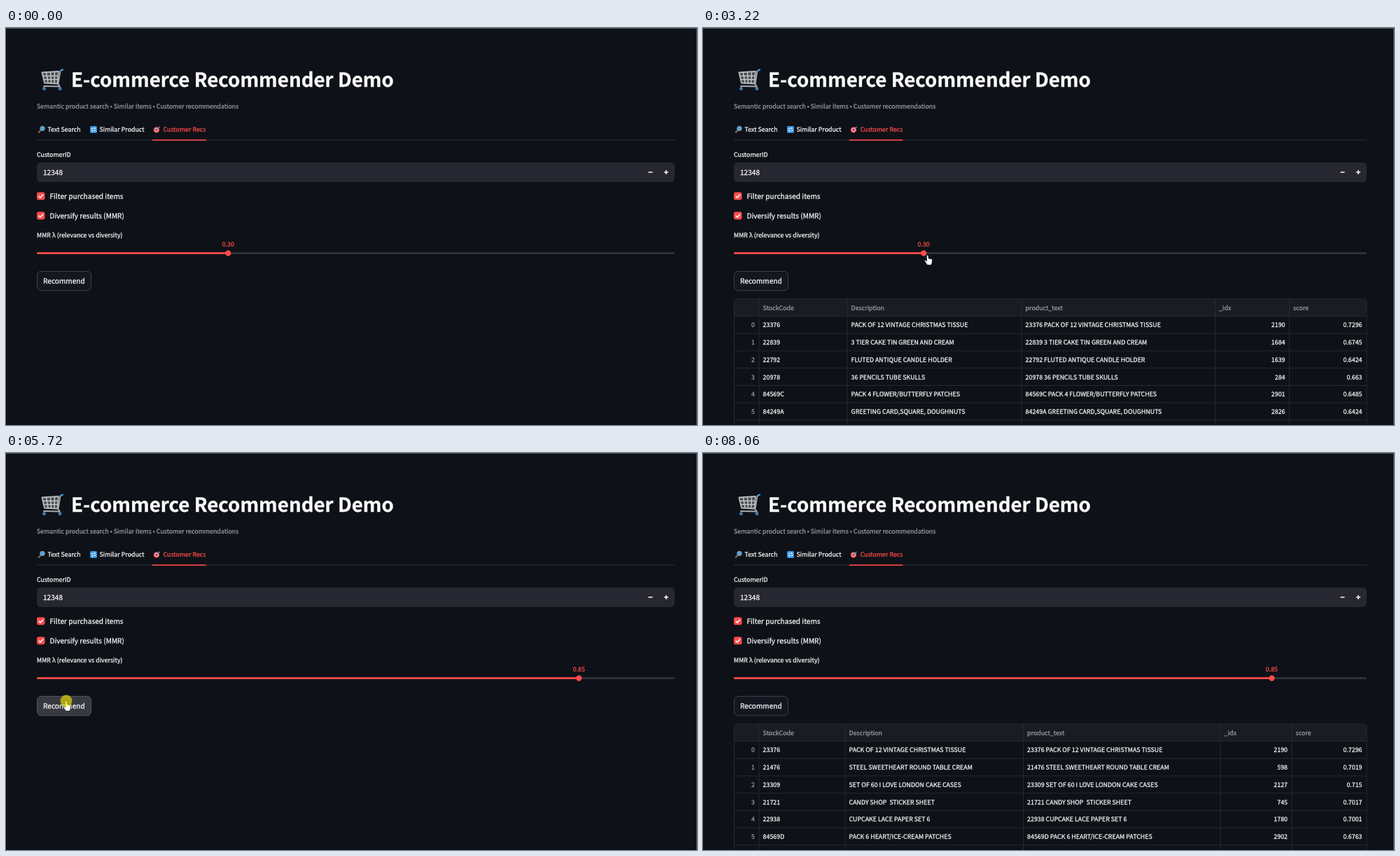
An HTML page for the animation above (8.85 s loop, 987x567 px).

```html
<!DOCTYPE html>
<html lang="en">
<head>
<meta charset="utf-8">
<title>E-commerce Recommender Demo</title>
<style>
html, body { margin: 0; width: 100%; height: 100%; overflow: hidden; background: #0e1117; }
svg { display: block; width: 987px; height: 567px; }
text {
  font: 10.15px "Noto Sans CJK JP", "Noto Sans CJK SC", "Noto Sans CJK", "Noto Sans", sans-serif;
  fill: #fafafa; stroke: #fafafa; stroke-width: .25; white-space: pre; text-rendering: geometricPrecision;
}
.title { font-size: 27.7px; font-weight: 700; stroke-width: .35; }
.small, .cell { font-size: 8.85px; }
.dim { fill: #9b9da2; stroke: #9b9da2; }
.red { fill: #ff4b4b; stroke: #ff4b4b; }
.end { text-anchor: end; }
.mid { text-anchor: middle; }
.grid { stroke: #262930; fill: none; }
.icon { stroke: #fafafa; stroke-width: 1.2; fill: none; }
.button { fill: #131720; stroke: #3d4047; }
.button.hover { fill: #262730; }
.button.down { fill: #363940; stroke: #50535a; }
</style>
</head>
<body>
<svg id="stage" viewBox="0 0 987 567">
  <rect width="987" height="567" fill="#0e1117"/>
  <path d="M0 .5H987M986.5 0V567" stroke="#54575c"/>

  <!-- cart -->
  <g fill="none" stroke-linecap="round" stroke-linejoin="round">
    <path d="M51.500 63.500L75 62 73.500 79.500 55 78.500Z" fill="#4a4d50" stroke="#b4b7b9" stroke-width="1.800"/>
    <path d="M52.500 68.500H74.500M54 73.500H74M57.500 63.500L60 78M63.500 63L64.500 78M69.500 62.500L69 78.500" stroke="#c3c6c8" stroke-width="1.500"/>
    <path d="M80.500 60L77.500 61.500 74.500 80.500 77 83.500 54 83" stroke="#a8abad" stroke-width="1.800"/>
    <path d="M78.500 60.500L81 59.500" stroke="#4398d4" stroke-width="2.200"/>
    <g fill="#3a4a55" stroke="#4398d4" stroke-width="1.300"><circle cx="54.500" cy="86.700" r="1.700"/><circle cx="77" cy="86.700" r="1.700"/></g>
  </g>
  <text class="title" x="93" y="84">E-commerce Recommender Demo</text>
  <text class="small dim" x="44" y="115">Semantic product search • Similar items • Customer recommendations</text>

  <!-- tab icons -->
  <path d="M50 145.500L46.800 149" stroke="#8a6a55" stroke-width="2" stroke-linecap="round"/>
  <circle cx="52" cy="143.500" r="3.300" fill="#4ea5e0" stroke="#8e9aa3" stroke-width=".9"/>
  <rect x="120" y="140" width="10" height="10" rx="1.500" fill="#2f8fe0"/>
  <path d="M122 145V143.200H127.500M126 141.800L127.700 143.200 126 144.600M128 145V146.800H122.500M124 145.400L122.300 146.800 124 148.200" fill="none" stroke="#fff" stroke-width=".9"/>
  <circle cx="215" cy="145.500" r="4.300" fill="#e0383e"/>
  <circle cx="215" cy="145.500" r="2.600" fill="none" stroke="#f5dcdc" stroke-width="1"/>
  <path d="M215 145.500L219.500 141" stroke="#4b9cd8" stroke-width="1.500"/>
  <text class="small" x="59.500" y="148.300">Text Search</text>
  <text class="small" x="133.500" y="148.300">Similar Product</text>
  <text class="small red" x="224.500" y="148.300">Customer Recs</text>
  <rect class="wide" x="44" y="159.400" height="1.400" fill="#262931"/>
  <rect x="209" y="159.300" width="76.500" height="1.600" fill="#ff4b4b"/>

  <text class="small" x="44" y="183.500">CustomerID</text>
  <rect class="wide" x="44" y="192" height="28" rx="5.500" fill="#262730"/>
  <text x="53" y="209.500">12348</text>
  <path id="steppers" d="M-37.500 206H-31.500M-15 206H-9M-12 203V209" stroke="#fafafa" stroke-width="1.500"/>

  <g id="checks"></g>
  <text x="62.500" y="243.700">Filter purchased items</text>
  <text x="62.500" y="271.900">Diversify results (MMR)</text>

  <text class="small" x="44" y="299.300">MMR λ (relevance vs diversity)</text>
  <rect class="wide" x="44" y="320.200" height="2.800" rx="1.400" fill="#31333b"/>
  <rect id="fill" x="44" y="320.200" height="2.800" rx="1.400" fill="#ff4b4b"/>
  <circle id="thumb" cy="321.600" r="4.200" fill="#ff4b4b"/>
  <text id="value" class="small red mid" y="312.400"></text>

  <rect id="button" class="button" x="44.500" y="347.500" width="77" height="27.500" rx="5.500"/>
  <text x="53" y="365">Recommend</text>

  <g id="tables"></g>
  <g id="tools" class="icon">
    <path d="M902.800 373.500V375.800H909.200V373.500M906 369.500V373.800M904 372L906 374 908 372"/>
    <circle cx="920.700" cy="372" r="2.300"/><path d="M922.400 373.700L925 376.300"/>
    <path d="M934.300 372V370H936.300M938 370H940V372M940 374V376H938M936.300 376H934.300V374"/>
  </g>
  <path id="busy" d="M879 .5Q879 2.200 882.500 2.200T886 .5M889.800 .8L889.200 2.600" fill="none" stroke="#a0a2a6" stroke-width="1.100"/>

  <g id="pointer" stroke="#0e1117" stroke-width=".7" fill="#fff" stroke-linejoin="round">
    <path id="arrow" d="M0 0V11L2.600 8.700 4.600 13 6.500 12.200 4.600 8H8Z"/>
    <path id="hand" d="M-1.500 1Q-.2-.7 1 1V5L5.500 6Q6.800 6.400 6.600 8L5.800 12.500Q5.500 14.500 3.800 14.500H.6Q-.8 14.500-1.600 13L-4.500 8.800Q-4.800 7.300-3.300 7.500L-1.500 9Z"/>
    <path id="fist" d="M-4-1Q-4-3.500-2-3.500-1-5 .3-4 2-4.500 2.500-3.300 4.500-3.300 4.500-1V1.500Q4.500 5 2 5H-1.500Q-3-1 5-4 2Z"/>
    <circle id="press" r="8.500" stroke="none" fill="#ffee00" fill-opacity=".6"/>
  </g>
</svg>
<script>
const LOOP = 8850, LEFT = 44, TOP = 387, ROW = 24.7;
const $ = id => document.getElementById(id);

// [time, x, y]
const path = [
  [250, 861, 481], [460, 650, 390], [670, 464, 333], [940, 464, 333], [1330, 88, 357],
  [1600, 88, 357], [1800, 250, 363], [1930, 338, 376], [2010, 338, 376], [2350, 372, 432],
  [2730, 345, 417], [2790, 345, 417], [3220, 321, 324], [3560, 321, 324], [3820, 451, 321],
  [3970, 451, 321], [4230, 638, 320], [4310, 638, 320], [4710, 818, 321], [4910, 818, 321],
  [5450, 86, 354], [6400, 86, 354], [6580, 95, 378], [6650, 110, 384], [6930, 300, 449],
  [7080, 300, 449], [7130, 308, 473], [7190, 308, 473], [7400, 330, 540], [7680, 350, 396], [8000, 420, 553]
];
const presses = [[1400, 1500], [3560, 4780], [5720, 5850]];
const busyTimes = [[1700, 2330], [4050, 5100], [5920, 6400]];
const shows = [[2330, 3970], [6400, LOOP]];
const within = (t, spans) => spans.findIndex(([a, b]) => t >= a && t < b);

const tables = [
  { cols: [80, 206, 455, 731.5, 837.5], idxEnd: 831.5, rows: [
    ["23376", "PACK OF 12 VINTAGE CHRISTMAS TISSUE", 2190, 0.7296],
    ["22839", "3 TIER CAKE TIN GREEN AND CREAM", 1684, 0.6745],
    ["22792", "FLUTED ANTIQUE CANDLE HOLDER", 1639, 0.6424],
    ["20978", "36 PENCILS TUBE SKULLS", 284, 0.663],
    ["84569C", "PACK 4 FLOWER/BUTTERFLY PATCHES", 2901, 0.6485],
    ["84249A", "GREETING CARD,SQUARE, DOUGHNUTS", 2826, 0.6424]] },
  { cols: [80, 203, 457.5, 739, 841], idxEnd: 835, rows: [
    ["23376", "PACK OF 12 VINTAGE CHRISTMAS TISSUE", 2190, 0.7296],
    ["21476", "STEEL SWEETHEART ROUND TABLE CREAM", 598, 0.7019],
    ["23309", "SET OF 60 I LOVE LONDON CAKE CASES", 2127, 0.715],
    ["21721", "CANDY SHOP  STICKER SHEET", 745, 0.7017],
    ["22938", "CUPCAKE LACE PAPER SET 6", 1780, 0.7001],
    ["84569D", "PACK 6 HEART/ICE-CREAM PATCHES", 2902, 0.6763]] }
];
const heads = ["StockCode", "Description", "product_text", "_idx", "score"];
const cell = (x, y, s, cls = "") => `<text class="cell ${cls}" x="${x}" y="${y}">${s}</text>`;

function tableMarkup({ cols, idxEnd, rows }) {
  const lines = cols.map(x => `M${x} ${TOP}V567`).join("") +
    rows.concat(0).map((_, i) => `M44 ${TOP + ROW * (i + 1)}H948`).join("");
  const body = rows.map(([code, name, idx, score], i) => {
    const y = 427.4 + ROW * i;
    return cell(74, y, i, "dim end") + cell(cols[0] + 5.6, y, code) + cell(cols[1] + 5.6, y, name) +
      cell(cols[2] + 5.6, y, `${code} ${name}`) + cell(idxEnd, y, idx, "end") + cell(941.5, y, score, "end");
  }).join("");
  return `<g><path d="M44.500 412V392.500Q44.500 387 50 387H942.500Q948 387 948 392.500V412Z" fill="#1a1c24"/>
    <rect class="glow" x="44" width="904" height="${ROW}" fill="#161920"/>
    <path class="grid" d="${lines}M44.500 570V392.500Q44.500 387 50 387H942.500Q948 387 948 392.500V570"/>
    ${heads.map((h, i) => cell(cols[i] + 5.6, 402.7, h, "dim")).join("")}${body}</g>`;
}
$("tables").innerHTML = tables.map(tableMarkup).join("");
$("checks").innerHTML = [240, 268].map(y =>
  `<rect x="44" y="${y - 5.6}" width="11.500" height="11.200" rx="2.800" fill="#ff4b4b"/>
   <path d="M46.800 ${y}L49 ${y + 2.3} 53 ${y - 2.3}" fill="none" stroke="#fff" stroke-width="1.600"/>`).join("");

const groups = [...$("tables").children];
const wide = document.querySelectorAll(".wide");
const show = (el, on) => { el.style.display = on ? "" : "none"; };

function pointerAt(t) {
  const i = path.findIndex(p => p[0] > t);
  if (i < 1) return path[path.length - 1].slice(1);
  const [t0, x0, y0] = path[i - 1], [t1, x1, y1] = path[i];
  const k = (t - t0) / (t1 - t0);
  return [x0 + (x1 - x0) * k, y0 + (y1 - y0) * k];
}

function sliderAt(t, x, width) {
  if (t < 3560) return 0.3;
  if (t >= 4710) return 0.85;
  return Math.max(0.3, Math.round((x - LEFT) / width * 20) / 20);
}

function draw(t) {
  const [x, y] = pointerAt(t);
  const live = t >= 250 && t < 8060;
  const table = within(t, shows), down = within(t, presses) >= 0;
  const width = table < 0 ? 911 : 904;
  const right = LEFT + width;

  wide.forEach(el => el.setAttribute("width", width));
  $("steppers").setAttribute("transform", `translate(${right})`);

  const value = sliderAt(t, x, width), thumbX = LEFT + value * width;
  $("fill").setAttribute("width", thumbX - LEFT);
  $("thumb").setAttribute("cx", thumbX);
  $("value").setAttribute("x", thumbX);
  $("value").textContent = value.toFixed(2);

  const onButton = live && x > 44 && x < 122 && y > 347 && y < 375;
  $("button").setAttribute("class", "button" + (onButton ? down ? " down" : " hover" : ""));

  // row highlight trails the pointer a little
  const row = Math.floor((pointerAt(Math.max(250, t - 65))[1] - TOP) / ROW) - 1;
  groups.forEach((g, i) => {
    show(g, i === table);
    const glow = g.querySelector(".glow");
    show(glow, live && row >= 0);
    glow.setAttribute("y", TOP + ROW * (row + 1));
  });
  show($("tools"), live && table >= 0 && y > TOP);
  show($("busy"), within(t, busyTimes) >= 0);

  const drag = t >= 3560 && t < 4780;
  const onThumb = Math.hypot(x - thumbX, y - 321) < 9;
  const hand = !drag && (onButton || onThumb);
  show($("pointer"), live);
  $("pointer").setAttribute("transform", `translate(${x} ${y})`);
  show($("fist"), drag);
  show($("hand"), hand);
  show($("arrow"), !drag && !hand);
  show($("press"), down);
}

function tick() {
  draw(performance.now() % LOOP);
  requestAnimationFrame(tick);
}
tick();
</script>
</body>
</html>
```
